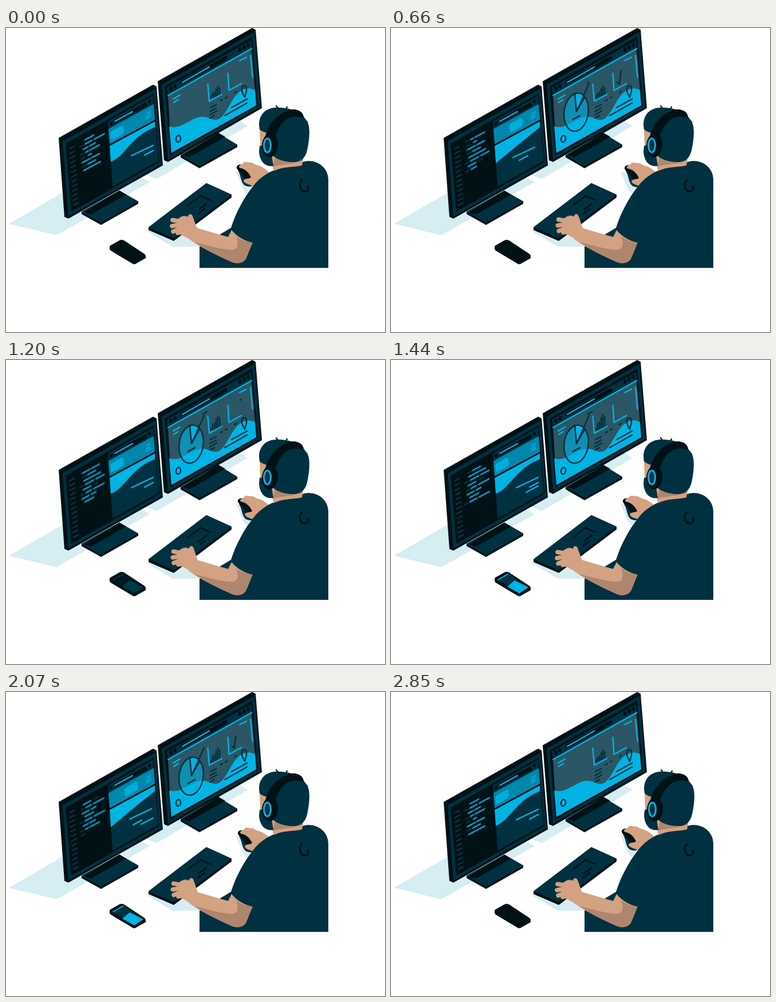
An HTML page without scripts that plays this animation: 662 by 531 pixels, repeating every 2880 ms.

```html
<!DOCTYPE html>
<html lang="en">
<head>
<meta charset="utf-8">
<title>Developer at a desk</title>
<style>
html, body { margin: 0; width: 100%; height: 100%; overflow: hidden; background: #fff; }
svg { display: block; width: 662px; height: 531px; }
.navy { fill: #003140; }
.ink { fill: #001216; }
.cyan { fill: #00b4e4; }
.slate { fill: #2b5665; }
.skin { fill: #d3a282; }
.shade { fill: #ae866f; }
.shadow { fill: #d6edf2; }
.ln { fill: none; stroke-width: 2.4; stroke-linecap: round; stroke-linejoin: round; }
.sn { stroke: #003140; }
.si { stroke: #001216; }
.sc { stroke: #00b4e4; }
.ss { stroke: #d3a282; }
.dim { stroke: #10343d; }

.anim, .anim * { animation-duration: 2.88s; animation-iteration-count: infinite; }
.half { animation-duration: 1.44s !important; }

/* each line is typed behind a cover, then the block moves up one row */
.code { animation-name: code; animation-timing-function: steps(12); animation-delay: -2.76s; }
@keyframes code { from { transform: translateY(-7.5px); } to { transform: translateY(-97.5px); } }
.cover { animation: type .24s linear -.12s infinite; }
@keyframes type { 50%, 100% { transform: translateX(50px); } }

.card { animation-name: card; animation-timing-function: ease-in-out; }
@keyframes card { 0%, 28% { transform: none; } 42%, 67% { transform: translate(24.5px, -13.5px); } 76%, 100% { transform: none; } }
.la { animation-name: la; }
@keyframes la { 0%, 16% { transform: none; } 22% { transform: translate(-6px, 3px); } 33% { transform: translate(-8px, 6px); } 39%, 62% { transform: none; } 72% { transform: translate(-3px, -1px); } 82%, 100% { transform: none; } }
.lb { animation-name: lb; }
@keyframes lb { 0%, 16% { transform: none; } 22%, 33% { transform: translate(-18px, 9px); } 39%, 62% { transform: none; } 72% { transform: translate(-20px, 10px); } 82%, 100% { transform: none; } }
.lc { stroke-dasharray: 25 30; stroke-dashoffset: 27; animation-name: lc; }
@keyframes lc { 0%, 42% { stroke-dashoffset: 27; } 49%, 73% { stroke-dashoffset: 0; } 80%, 100% { stroke-dashoffset: 27; } }

.pie { transform-origin: 323px 147px; animation-name: pie; animation-timing-function: linear; }
@keyframes pie { 0%, 6% { transform: scale(0); } 18%, 82% { transform: none; } 95%, 100% { transform: scale(0); } }
.lead, .tag { stroke-dasharray: 1 2; stroke-dashoffset: 1.1; }
.lead { animation-name: lead; }
@keyframes lead { 0%, 17% { stroke-dashoffset: 1.1; visibility: hidden; } 17.1% { visibility: visible; } 23%, 72% { stroke-dashoffset: 0; } 80% { stroke-dashoffset: 1.1; visibility: visible; } 80.1%, 100% { stroke-dashoffset: 1.1; visibility: hidden; } }
.tag { animation-name: tag; }
@keyframes tag { 0%, 22% { stroke-dashoffset: 1.1; visibility: hidden; } 22.1% { visibility: visible; stroke-dashoffset: .98; } 29%, 64% { stroke-dashoffset: 0; visibility: visible; } 71%, 100% { stroke-dashoffset: 1.1; visibility: hidden; } }
.trace { stroke-dasharray: 65 200; animation-name: trace; animation-timing-function: linear; }
@keyframes trace { 0%, 25% { stroke-dashoffset: 67; } 45.8% { stroke-dashoffset: 1; } 66.7% { stroke-dashoffset: -57; } 77% { stroke-dashoffset: -80; } 86%, 100% { stroke-dashoffset: -104; } }
.bars path { transform-box: fill-box; transform-origin: bottom; animation-name: bars; }
.bars path:first-child { animation: none; }
@keyframes bars { 0%, 38% { transform: none; } 50% { transform: scaleY(1.45); } 72% { transform: scaleY(1.25); } 85%, 100% { transform: none; } }

.lit { animation-name: lit; }
@keyframes lit { 0%, 41% { opacity: 0; } 45%, 95% { opacity: 1; } 98.5%, 100% { opacity: 0; } }
.head { animation-name: head; animation-timing-function: ease-in-out; }
@keyframes head { 0%, 10% { transform: none; } 20%, 25% { transform: translateX(-1px); } 33%, 42% { transform: none; } 50% { transform: translateX(-1px); } 62%, 100% { transform: none; } }
.mouse { animation-name: mouse; animation-timing-function: ease-in-out; }
@keyframes mouse { 0%, 10% { transform: none; } 22% { transform: translate(5px, 1px); } 33%, 74% { transform: translate(2px, 3px); } 86%, 100% { transform: none; } }
.hand { transform-origin: 330px 358px; animation-name: hand; }
@keyframes hand { 0%, 33%, 50%, 100% { transform: none; } 10%, 23%, 42%, 72% { transform: translateX(1px) rotate(1.5deg); } 88% { transform: translateX(-1px) rotate(-1.5deg); } }
</style>
</head>
<body>
<svg class="anim" viewBox="0 0 662 531">
<defs>
  <clipPath id="win"><path d="M-3-4H46V57H-3z"/></clipPath>
  <clipPath id="page"><path d="M178 163L257 118 267 232 186 277z"/></clipPath>
  <g id="rows" class="ln">
    <path class="dim" d="M0 7.5h5M1 22.5h5M3 30h6M2 37.5h6M5 45h6M0 60h6M24 67.5h8M2 75h5"/>
    <path class="sc" d="M9 0h15M9 7.5h12M25 7.5h18M6 15h8M17 15h10M10 22.5h5M18 22.5h16M15 30h5M5 37.5h13M21 37.5h13M14 45h13M7 52.5h29M10 60h14M28 60h14M6 67.5h13M11 75h9M24 75h18M4 82.5h12M20 82.5h8"/>
  </g>
</defs>

<!-- desk shadows -->
<path class="shadow" d="M5 342L190 235 251 269 88 362zM205 240L380 145 422 171 263 264zM243 353L291 382H338V372L300 360zM401 250L414 282 426 295 440 270z"/>

<!-- left monitor -->
<path class="ink" d="M132 321L198 284 231 303V307L166 344 132 325z"/>
<path class="navy" d="M132 321L198 284 231 303 166 340z"/>
<path class="ink" d="M136 322L198 284 210 291 148 326z"/>
<path class="ink" d="M92 192L257 99 263 102 274 240 109 333 102 330z"/>
<path class="navy" d="M99 198L261 106 271 238 109 329z"/>
<path class="ink" d="M104 202L258 114 268 234 114 321z"/>
<path class="ln dim" d="M111 211l8-4m-7.4 12.2l8-4m-7.4 12.2l8-4m-7.4 12.2l8-4m-7.4 12.2l8-4m-7.4 12.2l8-4m-7.4 12.2l8-4m-7.4 12.2l8-4m-7.4 12.2l8-4m-7.4 12.2l8-4m-7.4 12.2l8-4m-7.4 12.2l8-4m-7.4 12.2l8-4"/>
<g transform="translate(129 200) skewY(-28)" clip-path="url(#win)">
  <g class="code"><use href="#rows"/><use href="#rows" y="90"/></g>
  <path class="ink cover" d="M-3 49H47V58H-3z"/>
</g>
<g clip-path="url(#page)">
  <path class="navy" d="M178 163L257 118 267 232 186 277z"/>
  <path class="ln si" style="stroke-width:7" d="M191 163L243 134"/>
  <path class="ln sc" d="M190 163L221 146"/>
  <ellipse class="ink" cx="183.5" cy="167" rx="2.6" ry="3.5"/>
  <ellipse class="ink" cx="250.5" cy="128" rx="2.6" ry="3.5"/>
  <path fill="#0087ac" d="M178 177L258 133 260 160 181 203z"/>
  <path class="card half" fill="#00aedc" d="M184 181Q182 182 182 185L183 193Q183 197 187 195L203 186Q206 184 206 181L205 173Q204 169 201 171z"/>
  <path class="ln sc" style="stroke-width:1.8" d="M245 150l7-4m-7 9l7-4m-7 8l7-4"/>
  <path class="cyan" d="M181 206L260 163V173C239 182 229 191 215 206C203 220 192 231 182 234z">
    <animate attributeName="d" dur="1.44s" repeatCount="indefinite" keyTimes="0;.28;.45;.67;.76;1"
      values="M181 206L260 163V173C239 182 229 191 215 206C203 220 192 231 182 234z;M181 206L260 163V173C239 182 229 191 215 206C203 220 192 231 182 234z;M181 206L260 163V173C248 183 232 196 217 208C204 219 194 227 182 237z;M181 206L260 163V173C248 183 232 196 217 208C204 219 194 227 182 237z;M181 206L260 163V173C239 182 229 191 215 206C203 220 192 231 182 234z;M181 206L260 163V173C239 182 229 191 215 206C203 220 192 231 182 234z"/>
  </path>
  <path class="ln si" d="M180 205L260 162"/>
  <path class="ln sc la" d="M219 223L257 205"/>
  <path class="ln sc lb" d="M242 222L257 214"/>
  <path class="ln sc lc" d="M257 220L236 231"/>
</g>

<!-- right monitor -->
<path class="ink" d="M305 222L371 184 404 204V208L338 245 305 226z"/>
<path class="navy" d="M305 222L371 184 404 204 338 241z"/>
<path class="ink" d="M308 222L371 183 383 190 320 226z"/>
<path class="ink" d="M265 93L430 0 436 3 447 140 283 234 276 231z"/>
<path class="navy" d="M272 99L434 7 444 138 283 230z"/>
<path class="ink" d="M277 102L430 15 440 136 287 223z"/>
<path class="navy" d="M281 104L428 21 429 36 283 119z"/>
<path class="slate" d="M283 119L429 36 437 135 289 218z"/>
<path class="cyan" d="M285 172C305 178 321 158 340 155C356 154 360 164 372 159C388 150 394 115 416 107Q427 103 435 109L437 135 289 218z"/>
<path class="ln sc" d="M283 118L429 36"/>
<path class="ln si" style="stroke-width:7" d="M308 95L383 53"/>
<path class="ln sc" d="M308 95L355 68"/>
<g class="ink">
  <ellipse cx="288" cy="106" rx="3" ry="4"/><ellipse cx="295" cy="102" rx="3" ry="4"/>
  <ellipse cx="408.5" cy="37.5" rx="3" ry="4"/><ellipse cx="416" cy="33.5" rx="3" ry="4"/><ellipse cx="423" cy="29.5" rx="3" ry="4"/>
</g>
<path class="ln sc" d="M292 124l12-7M293 130l8-5M408 57l12-6M427 48L430.5 86M352.5 98L355 128 377 116M387.5 79L389.5 109 411 97"/>
<path class="ln sn" d="M357 139l10-5M356 146l11-6M356 152l12-7M357 157l7-4M375 127l3-2M383 122l3-1.5M399 113l3-2M394 139l27-15M382 153l39-22"/>
<path class="ln sn" d="M417 121C413 113 411 110 412 105C414 99 420 100 420 106C421 111 418 115 417 121z"/>
<ellipse class="ln sn" cx="301" cy="193.5" rx="4" ry="5.8" transform="rotate(10 301 193.5)"/>
<g class="ln sn bars">
  <path d="M358 123v-4"/><path d="M361 121.5v-7"/><path d="M364 120v-8"/><path d="M367 118.5v-12"/><path d="M370 117v-15"/><path d="M373.5 115.5v-11"/>
</g>
<path class="ln sn trace half" d="M395 95L399 98 402 72 406 76 410 69" pathLength="100"/>
<g class="pie">
  <ellipse cx="323.5" cy="147" rx="21" ry="33.5" fill="#00b4e4" fill-opacity=".6" transform="rotate(8 323.5 147)"/>
  <path class="cyan" d="M324 146L321 114Q332 111 338.5 121z"/>
  <ellipse class="ln sn" cx="323.5" cy="147" rx="21" ry="33.5" transform="rotate(8 323.5 147)"/>
  <path class="ln sn" d="M321 114L324 146 338.5 121M317.5 160L330 153"/>
</g>
<path class="ln sn lead" pathLength="1" d="M324 146L346 97"/>
<path class="ln sn tag" pathLength="1" d="M343.5 94.5L351 90.5"/>

<!-- keyboard -->
<path class="ink" d="M249 348L350 271 394 291V296L293 372 249 353z"/>
<path class="navy" d="M249 348L350 271 394 291 293 367z"/>
<path class="ln si" d="M319 309L340 293 357 301M337 317L350 307M335 325L347 316"/>

<!-- phone -->
<path class="shadow" d="M179 386L222 413 232 410 190 380z"/>
<path class="ink" d="M181 382Q181 380 184 379L198 371Q202 369 206 371L241 394Q244 396 244 398V402L228 411Q224 414 220 411L183 389Q181 387 181 385z"/>
<g class="lit">
  <path class="navy" d="M185 383L203 373Q205 373 207 374L240 397 223 407z"/>
  <path class="cyan" d="M203 396L216 385 240 397 224 407.5z"/>
  <path class="ln sc" style="stroke-width:2" d="M187 384L204 374"/>
</g>

<!-- mouse and right hand -->
<g class="mouse">
  <path class="ink" d="M403 245C402 239 409 237 415 240C425 246 431 258 434 270C432 278 424 278 417 275C409 268 411 255 403 245z"/>
  <path class="navy" d="M405 249C412 250 415 263 421 268L433 272C429 279 419 277 415 273C409 266 411 255 405 249z"/>
  <path class="skin" d="M407 243C407 238 412 240 414 236C418 232 423 235 426 235C430 234 433 238 437 239C447 241 454 247 465 257L436 278C429 274 417 273 415 267C416 262 424 264 428 261C424 252 418 247 411 245Q408 245 407 243z"/>
</g>

<!-- body -->
<path class="navy" d="M338 419V382L393 349C402 321 416 296 431 277C443 261 458 252 472 247C490 241 500 239 518 234C540 227 563 242 563 265V419z"/>
<path class="ln si" style="stroke-width:3" d="M517 266C511 270 512 283 520 285C526 287 530 281 527 276"/>

<!-- left arm -->
<path class="skin" d="M326 347C347 353 370 360 388 365L394 353Q409 371 431 374L420 401C416 410 406 413 395 409C370 398 345 386 320 369z"/>
<path class="shade" d="M328 374C360 381 382 389 398 387C406 385 406 374 402 364Q413 373 431 374L420 401C416 410 406 413 395 409C370 398 350 387 328 374z"/>
<path class="navy" d="M394 348L396 354Q412 372 432 375L440 350z"/>
<g class="hand">
  <path class="skin" d="M300 334Q309 325 319 330L333 347 334 370 319 368Q309 362 302 360 296 350 300 334z"/>
  <path class="ln ss" style="stroke-width:7.5" d="M306 338L291 335.5M305 343L290 346M307 349L292 355.5M311 356L300 358M328 345L322 329"/>
</g>

<!-- head -->
<g class="head">
  <path class="skin" d="M462 222L467 250C485 241 501 244 517 240L519 230 500 222z"/>
  <path class="shade" d="M466 242C480 238 500 238 518 232L519 228 470 226z"/>
  <path class="skin" d="M443 176L444 205 462 212 466 190 452 172z"/>
  <path class="navy" d="M443 206C447 203 456 208 464 222L467 241C455 243 443 236 442 215z"/>
  <path class="navy" d="M443 177C439 158 448 141 470 139C492 138 514 144 523 159C533 168 530 193 527 209C524 226 517 232 506 234C488 235 474 230 466 223L455 183Q447 181 443 177z"/>
  <path class="ln sn" d="M472 136Q474 140 479 142M491 138L487 144M519 165Q522 162 526 164"/>
  <path class="ink" d="M453 190C458 165 480 143 504 142Q520 145 520 157C496 148 479 163 470 190z"/>
  <ellipse class="ink" cx="461" cy="205" rx="14" ry="21" transform="rotate(5 461 205)"/>
  <ellipse class="navy" cx="456.5" cy="205" rx="6" ry="12"/>
  <ellipse class="ln sc" cx="456.5" cy="205" rx="6" ry="12" style="stroke-width:3"/>
</g>
</svg>
</body>
</html>
```
